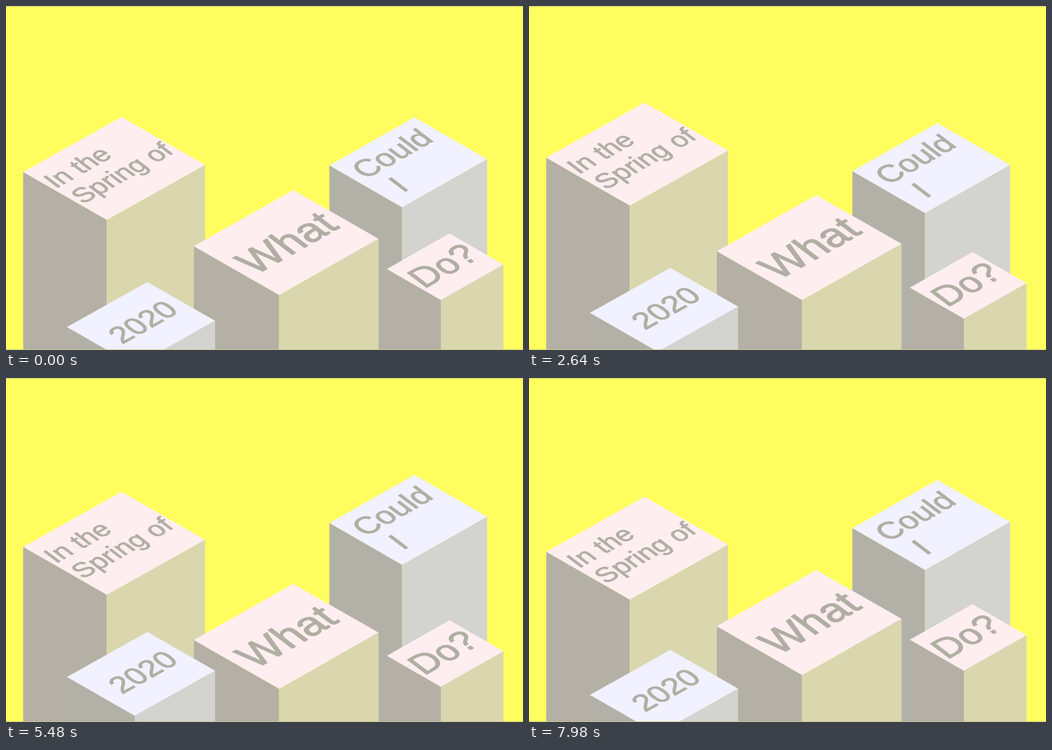
These frames come from a looping animation (900x600 px, 8000 ms). An HTML page with a canvas:

```html
<!DOCTYPE html>
<html lang="en">
<head>
<meta charset="utf-8">
<style>
  html, body { margin: 0; width: 100%; height: 100%; overflow: hidden; background: #fffe5e; }
  canvas { display: block; }
</style>
</head>
<body>
<canvas id="stage" width="900" height="600"></canvas>
<script>
const ctx = document.getElementById("stage").getContext("2d");
const LOOP = 8000, PERIOD = 196, SWING = 21;

const PINK = { top: "#ffeef0", left: "#b5b0a5", right: "#dad7af" };
const BLUE = { top: "#f1f1ff", left: "#b3b1a7", right: "#d3d3d0" };
const INK = "#b1aea4";

// left, front, right: corner x; leftRise, rightRise: how far those corners sit above the front one.
// mid, low: centre height and lowest step of the front corner's bobbing.
// text rows: [string, baseline x, baseline offset from the front corner].
const towers = [
  { colors: PINK, left: 30, front: 175.5, right: 346.5, leftRise: 83.5, rightRise: 96,
    mid: 369, low: 154, size: 46,
    text: [["In the", 87, -54], ["Spring of", 134, -27]] },
  { colors: BLUE, left: 563, front: 689.5, right: 837.5, leftRise: 73, rightRise: 84,
    mid: 343.5, low: 38.5, size: 53,
    text: [["Could", 626, -48.5], ["I", 691, -25]] },
  { colors: PINK, left: 327, front: 475.5, right: 648.5, leftRise: 85, rightRise: 98,
    mid: 521, low: 118.5, size: 73,
    text: [["What", 434, -34]] },
  { colors: BLUE, left: 106, front: 224, right: 364, leftRise: 67.5, rightRise: 78.5,
    mid: 606.5, low: 2.5, size: 52,
    text: [["2020", 202, -37]] },
  { colors: PINK, left: 663, front: 757, right: 866, leftRise: 54, rightRise: 62,
    mid: 530.7, low: 82, size: 62,
    text: [["Do?", 728, -19]] }
];

function face(color, ...points) {
  ctx.fillStyle = color;
  ctx.beginPath();
  for (const [x, y] of points) ctx.lineTo(x, y);
  ctx.fill();
}

// Steps are held for 20, 20 and 100 ms in turn.
function stepAt(ms) {
  const t = ms + 20, rest = t % 140;
  return 3 * Math.floor(t / 140) + (rest < 20 ? 0 : rest < 40 ? 1 : 2);
}

function drawTower(tower, step) {
  const { colors, left, front, right, leftRise, rightRise } = tower;
  const y = tower.mid + SWING * Math.cos(2 * Math.PI * (step - tower.low) / PERIOD);
  const leftY = y - leftRise, rightY = y - rightRise;

  face(colors.left, [left, leftY], [front, y], [front, 700], [left, 700]);
  face(colors.right, [front, y], [right, rightY], [right, 700], [front, 700]);
  face(colors.top, [left, leftY], [left + right - front, leftY - rightRise], [right, rightY], [front, y]);

  // A thin outline gives the lettering its medium weight.
  ctx.fillStyle = ctx.strokeStyle = INK;
  ctx.lineWidth = tower.size * 0.024;
  ctx.miterLimit = 3;
  ctx.font = `${tower.size}px "Liberation Sans", Arial, sans-serif`;
  for (const [words, x, offset] of tower.text) {
    ctx.setTransform(0.87, -0.492, 0.79, 0.6, x, y + offset);
    ctx.fillText(words, 0, 0);
    ctx.strokeText(words, 0, 0);
  }
  ctx.resetTransform();
}

function draw(now) {
  const step = stepAt(now % LOOP);
  ctx.fillStyle = "#fffe5e";
  ctx.fillRect(0, 0, 900, 600);
  for (const tower of towers) drawTower(tower, step);
  ctx.fillStyle = "#c9c790";
  ctx.fillRect(0, 0, 900, 1);
  ctx.fillRect(0, 599, 900, 1);
  requestAnimationFrame(draw);
}
requestAnimationFrame(draw);
</script>
</body>
</html>
```
